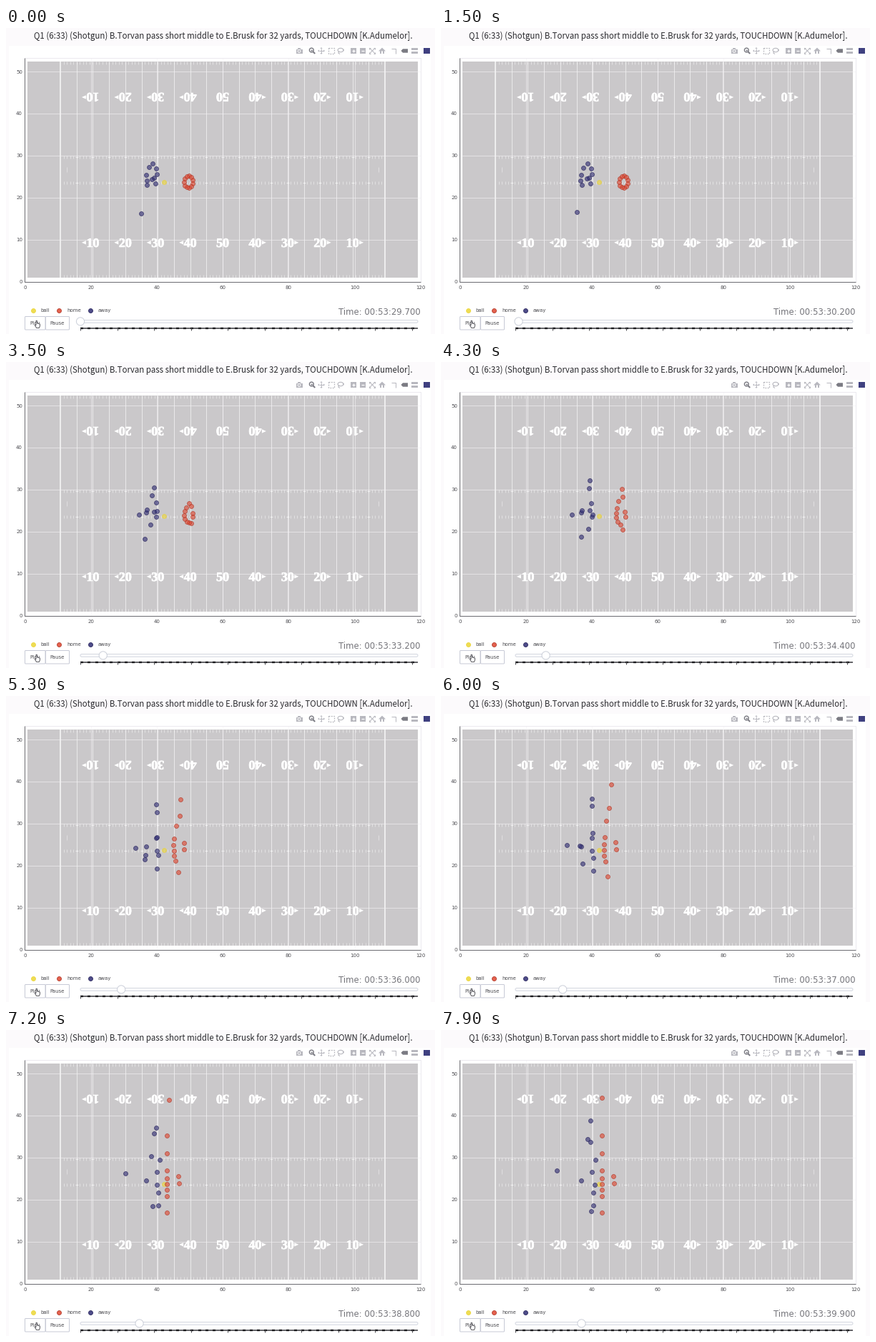
Animation of 600 by 429 pixels, one loop 8000 ms. Source, as a matplotlib script:

```python
import numpy as np
import matplotlib.pyplot as plt
from matplotlib.animation import FuncAnimation
from matplotlib.collections import LineCollection
from matplotlib.colors import to_rgb
from matplotlib.patches import Circle, FancyBboxPatch, Polygon, Rectangle
from matplotlib.patheffects import withStroke

W, H = 600, 429
FRAMES, INTERVAL = 80, 100
PT = 0.72  # points per pixel at 100 dpi

PAGE, TURF, INK, ICON, DARK = "#fcfafc", "#cac8ca", "#4c4c51", "#b8b8bf", "#7b7b83"
BALL, HOME, AWAY = "#ecd636", "#e0452f", "#2f2c74"

plt.rcParams["toolbar"] = "None"
fig = plt.figure(figsize=(W / 100, H / 100), dpi=100, facecolor=PAGE)
ax = fig.add_axes([0, 0, 1, 1])
ax.set(xlim=(0, W), ylim=(H, 0))
ax.axis("off")


def rect(x0, y0, x1, y1, fc, z=1):
    ax.add_patch(Rectangle((x0, y0), x1 - x0, y1 - y0, fc=fc, ec="none", zorder=z))


def rounded(x0, y0, x1, y1, r, fc, ec):
    ax.add_patch(FancyBboxPatch((x0, y0), x1 - x0, y1 - y0, fc=fc, ec=ec, lw=0.7, zorder=3,
                                boxstyle=f"round,pad=0,rounding_size={r}"))


def shape(points, fc, ec="none", z=3):
    ax.add_patch(Polygon(points, fc=fc, ec=ec, lw=0.7, zorder=z))


def lines(segments, color="white", lw=1.0, alpha=1.0, z=2):
    ax.add_collection(LineCollection(segments, colors=color, linewidths=lw * PT,
                                     alpha=alpha, zorder=z))


def columns(xs, y0, y1, **style):
    lines([[(x, y0), (x, y1)] for x in xs], **style)


def rows(ys, x0, x1, **style):
    lines([[(x0, y), (x1, y)] for y in ys], **style)


def label(x, y, s, px, color=INK, ha="left", font="DejaVu Sans", **kw):
    return ax.text(x, y, s, fontsize=px * PT, color=color, ha=ha, va="baseline",
                   family=font, zorder=6, **kw)


def dots(points, color, z, alpha=0.62):
    shade = 1 if color == BALL else 0.78
    edge = (*(shade * np.array(to_rgb(color))), min(1, alpha + 0.1))
    return ax.scatter(*np.transpose(points), s=(6 * PT) ** 2, zorder=z,
                      facecolor=[(*to_rgb(color), alpha)], edgecolor=[edge], linewidth=0.8 * PT)


# ---- field -------------------------------------------------------------
def yard_x(yard):
    return 76 + 4.54 * yard


def field():
    rect(4, 25, 594, H, "white", z=0)
    rect(30, 46.5, 576, 350, TURF)
    fives, yards = yard_x(np.arange(5, 100, 5)), yard_x(np.arange(1, 100))
    columns(fives, 47, 350, alpha=0.6)
    columns(yard_x(np.array([0, 100])), 47, 350, lw=1.5, alpha=0.9)
    for y in (49, 180.5, 217, 347.5):
        columns(yards, y - 2, y + 2, lw=0.8, alpha=0.55)
    for y in (180.5, 217):
        lines([[(x - 2, y), (x + 2, y)] for x in fives], lw=0.9, alpha=0.7)
    columns(yard_x(np.array([2, 98])), 195, 202, lw=0.8, alpha=0.5)

    for yard in range(10, 100, 10):
        x, s, side = yard_x(yard), str(50 - abs(yard - 50)), np.sign(yard - 50)
        style = dict(color="white", ha="center", font="Liberation Serif", weight="bold",
                     path_effects=[withStroke(linewidth=0.45, foreground="white")])
        label(x, 307, s, 18, **style)
        label(x, 91, s, 18, rotation=180, rotation_mode="anchor", **style)
        for y in (97, 300.8):
            if side:
                base = x + side * 9.5
                shape([(base + side * 6, y), (base, y - 2.7), (base, y + 2.7)], "white")


def axes_lines():
    tick_x, tick_y = 26.3 + 92.25 * np.arange(7), 355.6 - 58.9 * np.arange(6)
    columns(tick_x[1:6], 42, 355, color="#f4f2f5", alpha=0.6)
    rows(tick_y[1:], 27, 580, color="#f4f2f5", alpha=0.6)
    lines([[(26, 42), (580, 42), (580, 356)]], "#ebe9ee")
    lines([[(26.3, 42), (26.3, 355.7), (580, 355.7)]], "#6c6c71", z=3)
    for i, x in enumerate(tick_x):
        label(x, 366, str(20 * i), 7, ha="center")
    for i, y in enumerate(tick_y):
        label(23, y + 2.4, str(10 * i), 7, ha="right")


# ---- toolbar -----------------------------------------------------------
def toolbar():
    y = 32
    # camera
    rect(405.5, 29.5, 414.5, 35.5, ICON)
    rect(408, 28, 412, 30, ICON)
    ax.add_patch(Circle((410, 32.4), 1.9, fc=ICON, ec="white", lw=0.7, zorder=3))
    # zoom
    ax.add_patch(Circle((427.3, 31), 2.9, fc="none", ec=DARK, lw=1, zorder=3))
    lines([[(429.4, 33.2), (432.2, 36)]], DARK, 2)
    lines([[(425.8, 31), (428.8, 31)], [(427.3, 29.5), (427.3, 32.5)]], DARK, 0.8)
    # pan
    for dx, dy in ((1, 0), (-1, 0), (0, 1), (0, -1)):
        cx, cy = 441 + 3 * dx, y + 3 * dy
        lines([[(441, y), (cx, cy)]], ICON)
        shape([(cx + 2 * dx, cy + 2 * dy), (cx + 1.6 * dy, cy + 1.6 * dx),
               (cx - 1.6 * dy, cy - 1.6 * dx)], ICON)
    # box and lasso select
    ax.add_patch(Rectangle((450.5, 28), 8, 8, fc="none", ec=ICON, lw=0.9,
                           ls=(0, (1.5, 1.2)), zorder=3))
    a = np.linspace(0, 2 * np.pi, 30)
    ax.plot(468 + 4 * np.cos(a), 31 + 2.7 * np.sin(a), color=ICON, lw=0.8)
    ax.plot([465.5, 464.8, 466.5], [33, 35, 36.2], color=ICON, lw=0.8)
    # zoom in and out
    for x in (486, 499):
        rect(x - 4, y - 4, x + 4, y + 4, ICON)
        rows([y], x - 2.4, x + 2.4, lw=1.3)
    columns([486], y - 2.4, y + 2.4, lw=1.3)
    # autoscale
    for sx in (-1, 1):
        for sy in (-1, 1):
            cx, cy = 512.3 + 4 * sx, y + 4 * sy
            lines([[(512.3, y), (cx, cy)],
                   [(cx - 2 * sx, cy), (cx, cy), (cx, cy - 2 * sy)]], ICON)
    # home
    shape([(521, 32.4), (526, 27.6), (531, 32.4)], ICON)
    rect(522.7, 32, 525, 36, ICON)
    rect(527, 32, 529.3, 36, ICON)
    # spike lines and hover tags
    lines([[(539, 29), (544.5, 29), (544.5, 36)]], ICON)
    shape([(552.5, y), (555, 29.3), (562, 29.3), (562, 34.7), (555, 34.7)], DARK)
    for dy in (-2.3, 2.3):
        rect(567, y + dy - 1.7, 575.5, y + dy + 1.7, ICON)
    rect(584, 27.5, 592.5, 36, "#3f4080")


# ---- controls ----------------------------------------------------------
def controls():
    for x, name, color in ((37.5, "ball", BALL), (74, "home", HOME), (118, "away", AWAY)):
        dots([(x, 395.5)], color, 5, alpha=0.85)
        label(x + 11, 398.2, name, 7)
    for x0, x1, name in ((26.5, 55, "Play"), (55.5, 88.5, "Pause")):
        rounded(x0, 404.5, x1, 423, 1, "white", "#c6c9d5")
        label((x0 + x1) / 2, 416.4, name, 7, ha="center")

    # pointing hand
    shape([(42, 410.4), (43.4, 410.4), (43.6, 414), (47.4, 415), (47.4, 418),
           (46.4, 420.4), (42.6, 420.4), (40.2, 416.6), (42, 416.6)], "white", "#55555b", z=8)

    # slider rail and its crowded ticks
    rounded(104, 409.5, 576, 413.3, 1.9, "#fafafc", "#d3d7e0")
    rows([421], 104, 575.5, color="#4a4a4e", lw=1.7)
    lines([[(x, 421), (x + 4, 421)] for x in np.arange(104, 573, 10.3)], "#1c1c1f", 2.4)
    columns(np.arange(104, 576, 51.5), 420, 423.5, color="#4a4a4e")


# ---- motion ------------------------------------------------------------
CLOCK = [29.7, 31.6, 34.4, 36.0, 37.0, 38.8, 39.9]
STEP = [11, 25, 43, 53, 60, 72, 79]

# linemen and passer: from, to, and the clock span of the walk
LINE = [
    ((207, 210), (215.5, 181.5), 33.5, 39.4),
    ((209.5, 196.5), (210.8, 198.5), 31.6, 37),
    ((209, 217.5), (211.4, 217.3), 31.6, 35),
    ((210.5, 205), (213.4, 228.3), 31.6, 38),
    ((197.2, 219.5), (212.9, 246), 30.6, 37.6),
    ((204, 211.5), (196, 211), 29.7, 33.5),
]
# backs and receivers: corners of the route as clock, x, y
ROUTES = [
    [(29.7, 196.5, 213.5), (34.4, 182.5, 214), (36, 181, 212.5), (39.9, 162, 197)],
    [(31.6, 205.3, 190), (37, 210.5, 143.5), (38.6, 207.5, 143.5), (39.9, 204.5, 153)],
    [(29.7, 199.5, 194.5), (31.6, 199, 201), (36, 211.4, 163), (39.9, 209, 127)],
    [(29.7, 189, 260), (34.4, 196, 244.5), (37, 194, 209.5), (39.9, 209, 157)],
    [(31.6, 196.3, 206), (34.4, 197, 208), (36, 194, 228.5), (39.9, 210, 254)],
]
# defensive front from top to bottom, with two men behind it
FRONT_Y = [94.5, 148, 172.5, 197, 207.5, 215.8, 224, 232.5, 256.2]
BEHIND = [(241, 205), (242, 215)]


def ease(clock, start, end):
    u = np.clip((clock - start) / (end - start), 0, 1)
    return u * u * (3 - 2 * u)


def clockwise_set():
    """Set positions in the order the players stand around the huddle."""
    front = [(224.5, y) for y in FRONT_Y]
    return np.array(front[:2] + BEHIND + front[:1:-1], float)


SET = clockwise_set()
ANGLE = 2 * np.pi * np.arange(len(SET)) / len(SET) - np.pi / 2 + 0.1
HUDDLE = np.stack([255.3 + 6.1 * np.cos(ANGLE), 215.7 + 8.4 * np.sin(ANGLE)], axis=1)


def defense(clock):
    # players spread out first, then step up; a longer way takes longer
    late = np.abs(SET - HUDDLE)[:, 1] / 50
    part = np.stack([ease(clock, 32.9, 38.2 + late), ease(clock, 31.8, 37.4 + late)], axis=1)
    return HUDDLE + part * (SET - HUDDLE)


def offense(clock):
    walk = [np.add(a, ease(clock, t0, t1) * np.subtract(b, a)) for a, b, t0, t1 in LINE]
    walk[2][0] += 4 * ease(clock, 38.8, 39.9)  # centre leans in at the snap
    run = []
    for route in ROUTES:
        t, x, y = np.transpose(route)
        run.append((np.interp(clock, t, x), np.interp(clock, t, y)))
    return np.array(walk + run)


field()
axes_lines()
toolbar()
controls()
label(304, 15.4, "Q1 (6:33) (Shotgun) B.Torvan pass short middle to E.Brusk for 32 yards, "
      "TOUCHDOWN [K.Adumelor].", 11.45, "#2c2c30", "center", "Noto Sans CJK JP")
timer = label(579.5, 401.6, "", 11.6, "#74747a", "right")
dots([(220.5, 215.5)], BALL, 5)
home_dots = dots(HUDDLE, HOME, 6)
away_dots = dots(offense(CLOCK[0]), AWAY, 7)
handle = Circle((104, 411.4), 5.6, fc="white", ec="#cbcfd9", lw=0.7, zorder=7)
ax.add_patch(handle)


def update(frame):
    clock = round(float(np.interp(frame, STEP, CLOCK)), 1)
    home_dots.set_offsets(defense(clock))
    away_dots.set_offsets(offense(clock))
    handle.center = (104 + 9.07 * (clock - CLOCK[0]), 411.4)
    timer.set_text(f"Time: 00:53:{clock:.3f}")
    return home_dots, away_dots, handle, timer


anim = FuncAnimation(fig, update, frames=FRAMES, interval=INTERVAL, repeat=True,
                     repeat_delay=0, blit=False)
plt.show()
```
